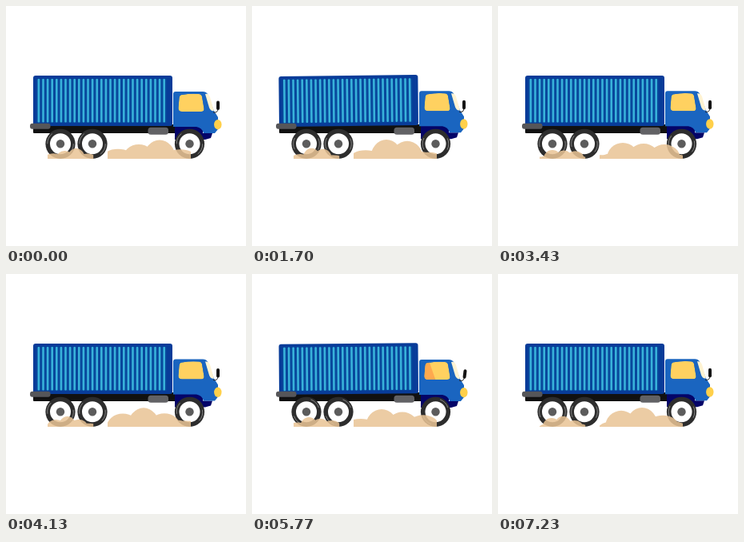
Recreate the animation shown at these times as an HTML page with a canvas. Size 300x300 px, loop 7.26 s.

```html
<!DOCTYPE html>
<html lang="en">
<head>
<meta charset="utf-8">
<title>Truck</title>
<style>
html, body { margin: 0; width: 100%; height: 100%; overflow: hidden; background: #fff; }
canvas { display: block; }
</style>
</head>
<body>
<canvas id="stage" width="300" height="300"></canvas>
<script>
const g = document.getElementById('stage').getContext('2d');
const LOOP = 7260, STEP = 70, SWAY = 3630;
const PUFF = 390, GAP = PUFF / 3, PEAKS = [24, 19, 25];

const bell = (t, mid, width) => Math.exp(-(((t - mid) / width) ** 2));
const clamp = v => Math.max(0, Math.min(1, v));

function box(x, y, w, h, r, color) {
  g.fillStyle = color;
  g.beginPath();
  g.roundRect(x, y, w, h, r);
  g.fill();
}

function disc(x, y, rx, ry, color) {
  g.fillStyle = color;
  g.beginPath();
  g.ellipse(x, y, rx, ry, 0, 0, 7);
  g.fill();
}

function shape(d, color) {
  g.fillStyle = color;
  g.fill(new Path2D(d));
}

// Draw something turned around x, y and raised
function posed(x, y, degrees, lift, draw) {
  g.save();
  g.translate(x, y - lift);
  g.rotate(degrees * Math.PI / 180);
  g.translate(-x, -y);
  draw();
  g.restore();
}

function container() {
  box(34, 87, 174, 63, 3, '#083c99');
  box(38, 91, 163, 55, 1, '#08489c');
  for (let x = 39.6; x < 198; x += 5.6) box(x, 91, 2.6, 54.5, 1, '#38b2da');
}

function mirror() {
  g.strokeStyle = '#222';
  g.lineWidth = 1;
  g.stroke(new Path2D('M259 133Q265 134 265 128'));
  box(263, 118.5, 4, 11.5, 2, '#151515');
}

function cab(shine, swing) {
  shape('M211 149H246V159H258L256 165L249 167H211Z', '#040468');
  shape('M209 110Q209 107 212 107H246Q250 107 252 110L260 131L265 139V154L261 159H247Q245 152 238 151H209Z', '#1a65c0');
  shape('M249 110Q253 109 255 114L260 131Q256 132 254 127Z', '#fff3d2');

  const pane = new Path2D('M220 111Q231 109 241 110Q244 110 245 113L247.5 128Q248 132 244 132H220Q215 132 215.5 127L216.5 115Q217 111 220 111Z');
  g.save();
  g.clip(pane);
  g.fillStyle = '#ffd160';
  g.fill(pane);
  g.globalAlpha = shine;
  shape('M214 108H221L230 134H214Z', '#ffa94e');
  g.restore();

  posed(259, 133, swing, 0, mirror);
  disc(264.8, 148.2, 4.7, 6.2, '#ffd04a');
}

function wheel(x, angle) {
  const y = 172.3;
  disc(x, y, 18.6, 18.6, '#2d2d2d');
  g.strokeStyle = '#999';
  g.lineWidth = .8;
  for (const a of [angle, angle + Math.PI]) {
    g.beginPath();
    g.arc(x, y, 16.3, a, a + .9);
    g.stroke();
  }
  disc(x, y, 13, 13, '#fff');
  disc(x, y, 5.2, 5.2, '#5c5c5c');
}

// Puffs leave the front wheel in turn, swell, and sink while drifting left
function dust(t, left, scale) {
  g.save();
  g.translate(left, 191);
  g.scale(scale, scale);
  g.beginPath();
  g.rect(0, -40, 104, 40);
  g.clip();
  g.beginPath();
  g.ellipse(54, 0, 54, 11, 0, 0, 7);
  for (let n = -3; n < 6; n++) {
    const x = 65 - .2 * (t % PUFF - GAP * (n + 1));
    const life = x / 103;
    if (life <= 0 || life >= 1) continue;
    const h = PEAKS[(n + 3) % 3] * Math.sin(Math.PI * life) ** .7;
    g.moveTo(x + 20, 0);
    g.ellipse(x, 0, 20, h, 0, 0, 7);
  }
  g.fillStyle = 'rgba(233, 196, 150, .86)';
  g.fill();
  g.restore();
}

function draw(t) {
  const s = t % SWAY;
  const tilt = .6 * clamp(1.6 * Math.sin(Math.PI * clamp((s - 850) / 1500)));
  const lift = clamp(s / 900) * .7 + 4.2 * bell(s, 1200, 160) - .7 * bell(s, 2110, 200);
  const swing = 7 * (bell(s, 1200, 160) + bell(s, 2110, 160));
  const shine = .6 * bell(s, 980, 100) + bell(s, 2110, 150);

  g.clearRect(0, 0, 300, 300);
  box(34, 148, 182, 11, 1, '#111');
  posed(121, 150, -tilt, 0, container);
  posed(212, 155, 0, lift, () => cab(shine, swing));
  box(30, 146.7, 25.5, 7, 3, '#565659');
  box(177.5, 151.7, 25.5, 9, 3.5, '#626265');
  for (const x of [68, 108, 229.5]) wheel(x, t / 110);
  dust(t, 52, .55);
  dust(t, 127, 1);
}

const start = performance.now();
function tick() {
  const t = (performance.now() - start) % LOOP;
  // Poses last 70 ms, shown on a 30 Hz grid
  const shown = Math.floor(t * .03 + .15) / .03;
  draw(Math.floor(shown / STEP + .001) * STEP);
  requestAnimationFrame(tick);
}
tick();
</script>
</body>
</html>
```
